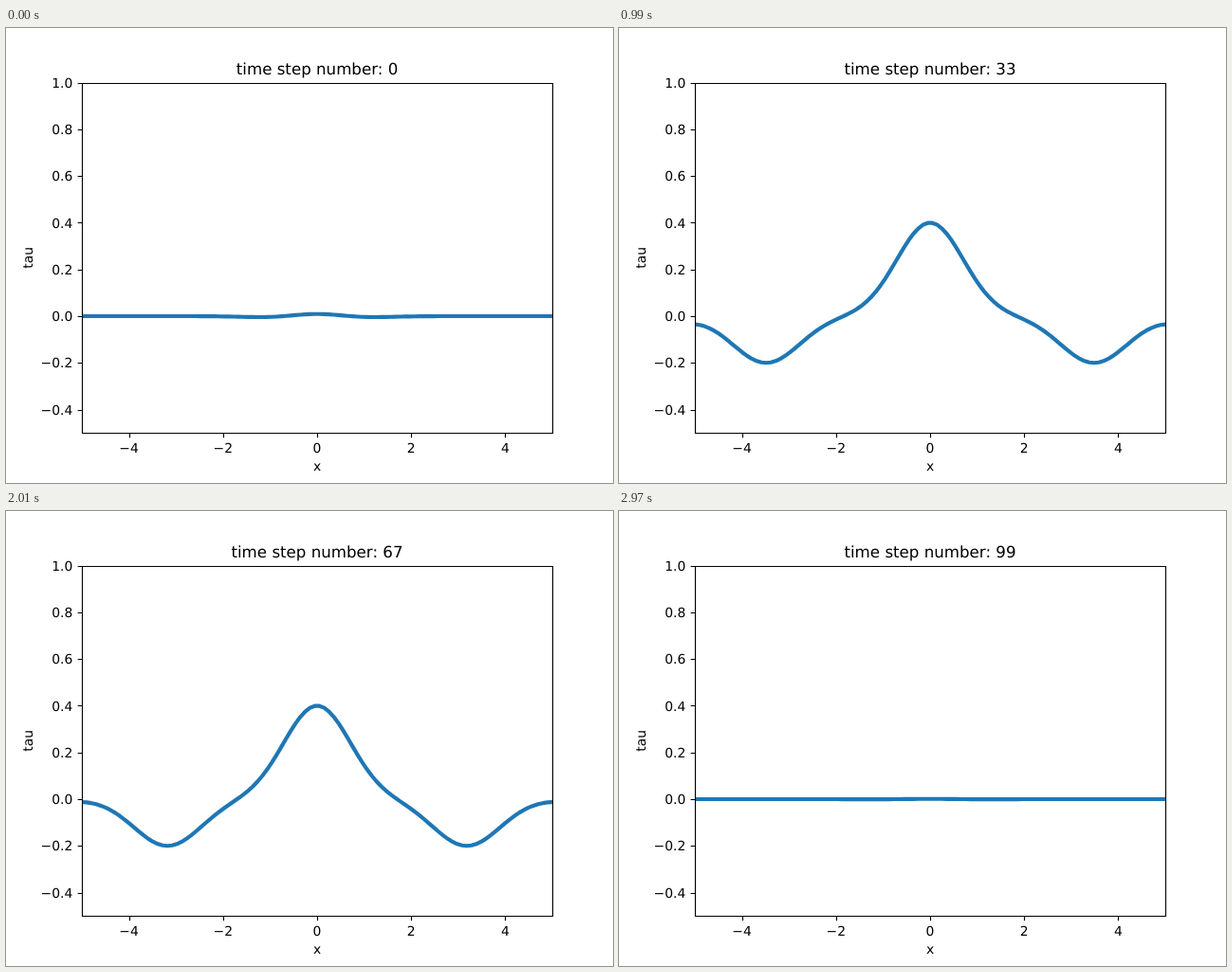
An HTML page that plays this animation: 640 px wide and 480 px high, repeating every 3 s.

```html
<!DOCTYPE html>
<html lang="en">
<head>
<meta charset="utf-8">
<title>Wave plot</title>
<style>
  html, body { margin: 0; width: 100%; height: 100%; overflow: hidden; background: #fff; }
  svg { display: block; width: 640px; height: 480px; }
  text { font: 13.889px "DejaVu Sans", sans-serif; text-rendering: geometricPrecision; text-anchor: middle; fill: #000; }
  #title { font-size: 16.667px; }
  #yticks text { text-anchor: end; }
  #wave { fill: none; stroke: #1f77b4; stroke-width: 4.167; stroke-linejoin: round; stroke-linecap: square; }
  #axes { fill: none; stroke: #000; stroke-width: 1.111; }
</style>
</head>
<body>
<svg viewBox="0 0 640 480">
  <clipPath id="plot"><rect x="80" y="57.6" width="496" height="369.6"/></clipPath>
  <g clip-path="url(#plot)"><path id="wave"/></g>
  <path id="axes"/>
  <g id="xticks"></g>
  <g id="yticks"></g>
  <text id="title" x="328" y="49"></text>
  <text x="328" y="467">x</text>
  <text transform="translate(28 242.4) rotate(-90)">tau</text>
</svg>
<script>
  const STEP_MS = 30, STEPS = 100, POINTS = 100;
  const DX = 10 / (POINTS - 1), PERIOD = POINTS * DX;
  const byId = id => document.getElementById(id);
  const px = x => 328 + 49.6 * x;
  const py = y => 304 - 246.4 * y;
  const snap = v => Math.round(v) + 0.5;

  function label(group, x, y, text) {
    const el = document.createElementNS('http://www.w3.org/2000/svg', 'text');
    el.setAttribute('x', x);
    el.setAttribute('y', y);
    el.textContent = text.replace('-', '\u2212');
    byId(group).append(el);
  }

  function drawAxes() {
    let d = 'M80.5 58.5H576.5V427.5H80.5Z';
    for (let x = -4; x <= 4; x += 2) {
      d += `M${snap(px(x))} 427.5v4.86`;
      label('xticks', px(x), 448, String(x));
    }
    for (let i = -2; i <= 5; i++) {
      const y = py(i / 5);
      d += `M80.5 ${snap(y)}h-4.86`;
      label('yticks', 70.3, Math.round(y + 5.2), (i / 5).toFixed(1));
    }
    byId('axes').setAttribute('d', d);
  }

  // Gaussian on a periodic domain
  function bell(x) {
    const r = x - PERIOD * Math.round(x / PERIOD);
    return Math.exp(-r * r);
  }

  // A standing bump minus two pulses running apart
  function tau(x, shift) {
    return 0.4 * bell(x) - 0.2 * (bell(x - shift) + bell(x + shift));
  }

  function draw(now) {
    const step = Math.floor(now / STEP_MS) % STEPS;
    const shift = (step + 1.5) * DX;
    const points = Array.from({ length: POINTS }, (_, i) => {
      const x = -5 + i * DX;
      return `${px(x).toFixed(2)} ${py(tau(x, shift)).toFixed(2)}`;
    });
    byId('wave').setAttribute('d', 'M' + points.join('L'));
    byId('title').textContent = `time step number: ${step}`;
  }

  function tick() {
    draw(performance.now());
    requestAnimationFrame(tick);
  }

  drawAxes();
  tick();
</script>
</body>
</html>
```
